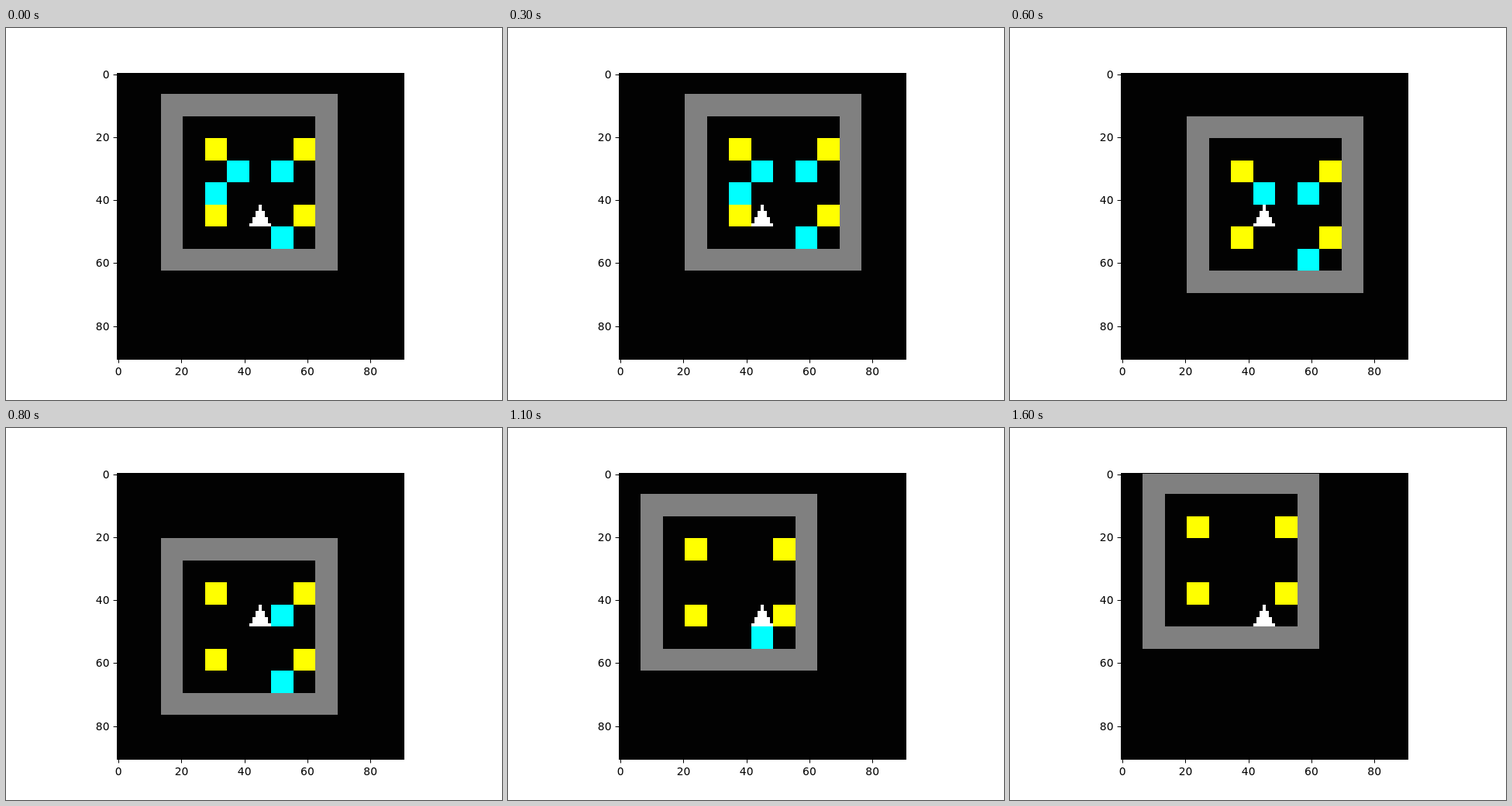
An HTML page with a canvas that plays this animation: 640 px wide and 480 px high, repeating every 1.7 s.

```html
<!DOCTYPE html>
<html lang="en">
<head>
<meta charset="utf-8">
<title>Grid walk</title>
<style>
  html, body { margin: 0; width: 100%; height: 100%; overflow: hidden; background: #fff; }
  canvas { display: block; width: 640px; height: 480px; }
</style>
</head>
<body>
<canvas id="stage" width="640" height="480"></canvas>
<script>
const ctx = document.getElementById('stage').getContext('2d');

const STEP = 100;
const LEFT = 143, TOP = 57, UNIT = 370 / 91; // plot origin and size of one data unit
const CELL = 7, CENTRE = 6, SIZE = 8;        // units per cell, walker cell, room width

// Walker position in the room at each step, as column and row digits.
const path = '45 35 45 35 34 24 34 33 43 53 54 55 45 55 45 55 56'
  .split(' ').map(p => [+p[0], +p[1]]);

const posts = [[2, 2], [6, 2], [2, 5], [6, 5]];
const coins = [[3, 3], [5, 3], [2, 4], [5, 6]].map(([x, y]) => ({
  x, y, taken: path.findIndex(p => p[0] === x && p[1] === y)
}));

const px = u => Math.round(LEFT + u * UNIT);
const py = u => Math.round(TOP + u * UNIT);

// Rectangle in data units, snapped to whole pixels.
function block(x, y, w, h, color) {
  ctx.fillStyle = color;
  ctx.fillRect(px(x), py(y), px(x + w) - px(x), py(y + h) - py(y));
}

const cells = (x, y, n, color) =>
  block(x * CELL, y * CELL, n * CELL, n * CELL, color);

function axes() {
  ctx.strokeStyle = '#000';
  ctx.lineWidth = 1;
  ctx.strokeRect(143.5, 58.5, 370, 369);

  ctx.fillStyle = '#000';
  ctx.font = '13.89px "DejaVu Sans", sans-serif';
  ctx.textBaseline = 'alphabetic';
  for (let v = 0; v <= 80; v += 20) {
    const offset = (v + 0.5) * 369.6 / 91;
    const x = 143.2 + offset, y = 57.6 + offset;
    ctx.fillRect(Math.round(x), 428, 1, 4.4);
    ctx.fillRect(138.6, Math.round(y), 4.4, 1);
    ctx.textAlign = 'center';
    ctx.fillText(v, x, 448);
    ctx.textAlign = 'right';
    ctx.fillText(v, 133.5, Math.round(y + 5.1));
  }
}

function walker() {
  const x = CENTRE * CELL, y = CENTRE * CELL;
  for (let row = 0; row < CELL; row++) {
    const half = row >> 1;
    block(x + 3 - half, y + row, 2 * half + 1, 1, '#fff');
  }
}

function draw(step) {
  const [wx, wy] = path[step];
  const ox = CENTRE - wx, oy = CENTRE - wy;

  ctx.fillStyle = '#fff';
  ctx.fillRect(0, 0, 640, 480);

  ctx.save();
  ctx.beginPath();
  ctx.rect(143, 58, 371, 370);
  ctx.clip();
  ctx.fillStyle = '#020202';
  ctx.fillRect(143, 58, 371, 370);
  cells(ox, oy, SIZE, '#808080');
  cells(ox + 1, oy + 1, SIZE - 2, '#020202');
  for (const [x, y] of posts) cells(ox + x, oy + y, 1, '#ff0');
  for (const c of coins) {
    if (step < c.taken) cells(ox + c.x, oy + c.y, 1, '#0ff');
  }
  walker();
  ctx.restore();

  axes();
}

let shown = -1;
const start = performance.now();

function tick() {
  const elapsed = Math.max(0, performance.now() - start);
  const step = Math.floor(elapsed / STEP) % path.length;
  if (step !== shown) draw(shown = step);
  requestAnimationFrame(tick);
}
tick();
</script>
</body>
</html>
```
